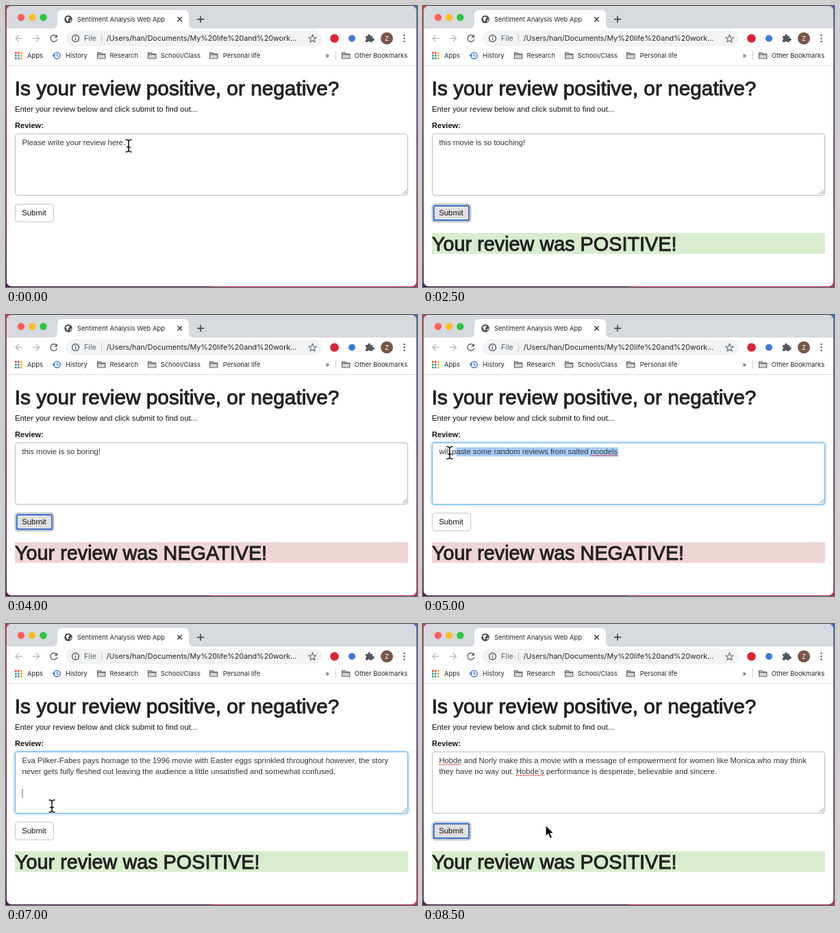
An HTML page for the animation above (9000 ms loop, 600 px wide and 412 px high).

```html
<!DOCTYPE html>
<html lang="en">
<head>
<meta charset="utf-8">
<title>Sentiment Analysis Web App</title>
<style>
  html, body { margin: 0; width: 100%; height: 100%; overflow: hidden; background: #fff; }
  svg { display: block; width: 600px; height: 412px; }
  text { font-family: "Liberation Sans", Arial, sans-serif; font-size: 11.3px; fill: #111; white-space: pre; }
  .ui text { font-family: Inter, sans-serif; font-size: 9.42px; fill: #222427; }
  .ui .url { font-size: 10.75px; }
  .big { font-size: 29.8px; fill: #222; stroke: #222; stroke-width: .95px; }
  .line { fill: none; stroke: #5f6368; stroke-width: 1.4; }
  #lines text { fill: #333; font-size: 11.25px; }
</style>
</head>
<body>
<svg viewBox="0 0 600 412">
  <defs>
    <linearGradient id="left" x2="0" y2="1"><stop stop-color="#d0384c"/><stop offset="1" stop-color="#4a1a50"/></linearGradient>
    <linearGradient id="right" x2="0" y2="1"><stop stop-color="#4468c8"/><stop offset=".5" stop-color="#84408f"/><stop offset="1" stop-color="#c0305c"/></linearGradient>
    <filter id="glow" x="-5%" y="-20%" width="110%" height="140%"><feGaussianBlur stdDeviation="1.6"/></filter>
    <g id="folder" fill="#d4d6d9" stroke="#63666a" stroke-width="1.2">
      <path d="M-5.5 4.3V-4H-1L.6-2.4H5.8V4.3Z"/><path d="M-5.5-1.6H5.8"/>
    </g>
    <path id="arrow" d="M0 0V16.5L3.8 13 6.6 19.4 9.6 18.1 6.9 11.9H12Z" fill="#000" stroke="#fff" stroke-width="1.1"/>
    <path id="beam" d="M-4-9Q0-9 0-6V6Q0 9-4 9M4-9Q0-9 0-6M0 6Q0 9 4 9M-2.5 2H2.5"/>
    <g id="ibeam" fill="none" stroke-linecap="round">
      <use href="#beam" stroke="#fff" stroke-width="3"/>
      <use href="#beam" stroke="#111" stroke-width="1.5"/>
    </g>
    <clipPath id="window"><rect x="1" width="598" height="411" rx="7"/></clipPath>
  </defs>

  <rect width="300" height="412" fill="url(#left)"/>
  <rect x="300" width="300" height="412" fill="url(#right)"/>

  <g clip-path="url(#window)">
    <rect width="600" height="412" fill="#fff"/>
    <g class="ui">
      <rect width="600" height="33" fill="#d6d9de"/>
      <circle cx="22" cy="16.8" r="5.2" fill="#fe5f57"/>
      <circle cx="38.2" cy="16.8" r="5.2" fill="#febc2e"/>
      <circle cx="54.4" cy="16.8" r="5.2" fill="#28c840"/>
      <path d="M68 33Q75 33 75 26V13Q75 6 82 6H260Q267 6 267 13V26Q267 33 274 33Z" fill="#fff"/>
      <circle cx="91" cy="19.5" r="5.7" fill="#45484c"/>
      <path d="M87 17.5L91 15.5 93.5 17 91 19 91.5 21 89.5 23ZM94 20L96 20.5 93 24Z" fill="#fff"/>
      <text x="104" y="23">Sentiment Analysis Web App</text>
      <path class="line" d="M250.3 16.3l6.4 6.4m0-6.4l-6.4 6.4M284 14.5v10m-5-5h10" style="stroke:#303236"/>

      <path class="line" d="M23.5 47.5H14m4.8-4.8L14 47.5l4.8 4.8M39 47.5h9.5m-4.8-4.8l4.8 4.8-4.8 4.8" style="stroke:#b9bbbe"/>
      <path class="line" d="M73.6 44.2A4.9 4.9 0 1 0 74.7 48.6"/>
      <path d="M75 41.8V46.6H70.2Z" fill="#5f6368"/>
      <rect x="87" y="36" width="374" height="23" rx="11.5" fill="#f1f3f4"/>
      <circle class="line" cx="101.5" cy="47.5" r="5"/>
      <path class="line" d="M101.5 47v3.2M101.5 44.6v1.3"/>
      <text class="url" x="114" y="51.3" style="fill:#5f6368">File</text>
      <path d="M139.5 41v13" stroke="#c3c6ca"/>
      <text class="url" x="146.7" y="51.3">/Users/han/Documents/My%20life%20and%20work...</text>
      <path class="line" d="M447.5 42.2L449 46l4 .3-3.1 2.6 1 4-3.4-2.2-3.4 2.2 1-4-3.1-2.6 4-.3Z" style="stroke-width:1.1"/>
      <circle cx="479.5" cy="47.5" r="6.3" fill="#dc2432"/>
      <circle cx="505" cy="47.5" r="5" fill="#3f78d8"/>
      <path d="M525 44h3.2a2 2 0 1 1 3.8 0H535v3.3a2 2 0 1 1 0 3.6V53h-3.4a1.8 1.8 0 0 0-3.4 0H525v-3.2a1.8 1.8 0 0 0 0-3.4Z" fill="#55595e"/>
      <circle cx="556" cy="47.5" r="9" fill="#795548"/>
      <text x="556" y="51" text-anchor="middle" style="fill:#fff">Z</text>
      <path d="M581.5 43v9.5" stroke="#55595e" stroke-width="2.4" stroke-linecap="round" stroke-dasharray="0 4.5"/>

      <g id="apps"></g>
      <text x="31" y="76.3">Apps</text>
      <circle class="line" cx="74.5" cy="72.7" r="4.6" style="stroke:#2f6fd6"/>
      <path class="line" d="M74.5 69.8v3.2l2.2 1.3M68 71.5l1.8 2.2 2-2" style="stroke:#2f6fd6;stroke-width:1.2"/>
      <text x="87" y="76.3">History</text>
      <use href="#folder" x="139" y="72.7"/><text x="151.5" y="76.3">Research</text>
      <use href="#folder" x="213" y="72.7"/><text x="225.7" y="76.3">School/Class</text>
      <use href="#folder" x="303" y="72.7"/><text x="316.7" y="76.3">Personal life</text>
      <text x="466.5" y="76">»</text>
      <path d="M481.5 66v13" stroke="#cbcdd0"/>
      <use href="#folder" x="496" y="72.7"/><text x="508.7" y="76.3">Other Bookmarks</text>
      <path d="M0 87.5H600" stroke="#d9dbde"/>
    </g>

    <text class="big" x="12.7" y="130.5">Is your review positive, or negative?</text>
    <text x="13" y="155">Enter your review below and click submit to find out...</text>
    <text x="13" y="179" style="font-weight:bold;font-size:11.1px">Review:</text>

    <rect id="halo" x="13" y="187" width="574" height="91" rx="4" fill="none" stroke="#66afe9" stroke-width="2.5" opacity=".6" filter="url(#glow)"/>
    <rect id="box" x="13.5" y="187.5" width="573" height="90" rx="3.5" fill="#fff"/>
    <path d="M579 276l6.5-6.5M582.5 276l3-3" stroke="#777" stroke-width=".9"/>
    <g id="lines"></g>

    <rect id="button" x="13.5" y="290.5" width="56" height="26" rx="3.5" fill="#fff"/>
    <rect id="ring" x="15.8" y="292.8" width="51.4" height="21.4" rx="2" fill="#e0e0e0" stroke="#1b57bd" stroke-width="1.7"/>
    <text x="23.2" y="307.3" style="font-size:11.4px">Submit</text>

    <g id="result">
      <rect id="band" x="13" y="333" width="574" height="30.5"/>
      <text id="verdict" class="big" x="13" y="359" style="font-size:28.8px"></text>
    </g>
  </g>
  <use id="pointer"/>
</svg>
<script>
const NS = "http://www.w3.org/2000/svg";
const $ = id => document.getElementById(id);

function add(parent, tag, attrs, text = "") {
  const node = document.createElementNS(NS, tag);
  for (const key in attrs) node.setAttribute(key, attrs[key]);
  node.textContent = text;
  return parent.appendChild(node);
}

const appColors = ["#e5443a", "#e5443a", "#f2b31b", "#35a353", "#4285f4", "#f2b31b", "#35a353", "#4285f4", "#f2b31b"];
appColors.forEach((fill, i) => add($("apps"), "rect", {
  x: 13 + i % 3 * 4, y: 67.5 + Math.floor(i / 3) * 4, width: 2.7, height: 2.7, fill
}));

const first = "Let us try some simple review first!";
const touching = "this movie is so touching!";
const boring = "this movie is so boring!";
const paste = "will paste some random reviews from salted noodels";
const drawn = "Gorgeously drawn, a visual spectacle with several important messages and a memorable score and\nsoundtrack that will leave anyone howling for days.";
const homage = "Eva Pilker-Fabes pays homage to the 1996 movie with Easter eggs sprinkled throughout however, the story\nnever gets fully fleshed out leaving the audience a little unsatisfied and somewhat confused.";
const sincere = "Hobde and Norly make this a movie with a message of empowerment for women like Monica who may think\nthey have no way out. Hobde's performance is desperate, believable and sincere.";
const POS = "POSITIVE", NEG = "NEGATIVE";

// mode: idle, type (caret at the end), select (from index `from`), sent (button focused)
const STEP = 500;
const steps = [
  { text: "Please write your review here.", mode: "idle", ibeam: [179, 205] },
  { text: first.slice(0, 15), mode: "type" },
  { text: first, mode: "type" },
  { text: first, mode: "select", arrow: [7, 204] },
  { text: touching.slice(0, 16), mode: "type" },
  { text: touching, mode: "sent", result: POS },
  { text: touching, mode: "select", result: POS, arrow: [11, 204] },
  { text: boring.slice(0, 20), mode: "type", result: POS },
  { text: boring, mode: "sent", result: NEG },
  { text: paste, mode: "type", result: NEG },
  { text: paste, mode: "select", from: 6, result: NEG, ibeam: [39, 202] },
  { text: drawn, mode: "type", result: NEG },
  { text: drawn, mode: "sent", result: POS },
  { text: drawn, mode: "select", result: POS, arrow: [9, 204] },
  { text: homage + "\n\n", mode: "type", result: POS, ibeam: [67, 267] },
  { text: homage, mode: "sent", result: NEG },
  { text: sincere, mode: "type", result: NEG },
  { text: sincere, mode: "sent", result: POS, arrow: [179, 295] }
];

const show = (id, on) => $(id).style.display = on ? "" : "none";

function drawLine(line, row, last, { mode, from = 0 }) {
  const group = $("lines"), left = 23.4, y = 204.3 + row * 16;
  const label = add(group, "text", { x: left, y }, line);
  const startX = i => i < line.length ? label.getStartPositionOfChar(i).x : left;
  const endX = i => i > 0 ? label.getEndPositionOfChar(i - 1).x : left;

  if (mode === "select") {
    const x = startX(from);
    const mark = add(group, "rect", { x, y: y - 10.3, width: endX(line.length) - x + 1, height: 13.5, fill: "#a5cdfb" });
    group.insertBefore(mark, label);
  }
  for (const word of line.matchAll(/Hobde('s)?|noodels/g)) {
    add(group, "line", {
      x1: startX(word.index), x2: endX(word.index + word[0].length), y1: y + 1.7, y2: y + 1.7,
      stroke: "#e0352b", "stroke-width": 1.5, "stroke-dasharray": "1.5 1"
    });
  }
  if (mode === "type" && last) {
    add(group, "rect", { x: endX(line.length) + .2, y: y - 10.3, width: .8, height: 13, fill: "#444" });
  }
}

function draw(state) {
  const { text, mode, result, arrow, ibeam } = state;
  const focused = mode === "type" || mode === "select", sent = mode === "sent";

  show("halo", focused);
  $("box").setAttribute("stroke", focused ? "#66afe9" : "#bcbcbc");
  $("lines").replaceChildren();
  text.split("\n").forEach((line, row, all) => drawLine(line, row, row === all.length - 1, state));

  show("ring", sent);
  $("button").setAttribute("stroke", sent ? "#8d9199" : "#c6c6c6");

  show("result", result);
  $("band").setAttribute("fill", result === POS ? "#d7edce" : "#efd6d6");
  $("verdict").textContent = `Your review was ${result}!`;

  const at = arrow || ibeam;
  show("pointer", at);
  if (at) {
    $("pointer").setAttribute("href", arrow ? "#arrow" : "#ibeam");
    $("pointer").setAttribute("transform", `translate(${at})`);
  }
}

let current = -1;
function tick() {
  const index = Math.floor(performance.now() / STEP) % steps.length;
  if (index !== current) draw(steps[current = index]);
  requestAnimationFrame(tick);
}
tick();
</script>
</body>
</html>
```
